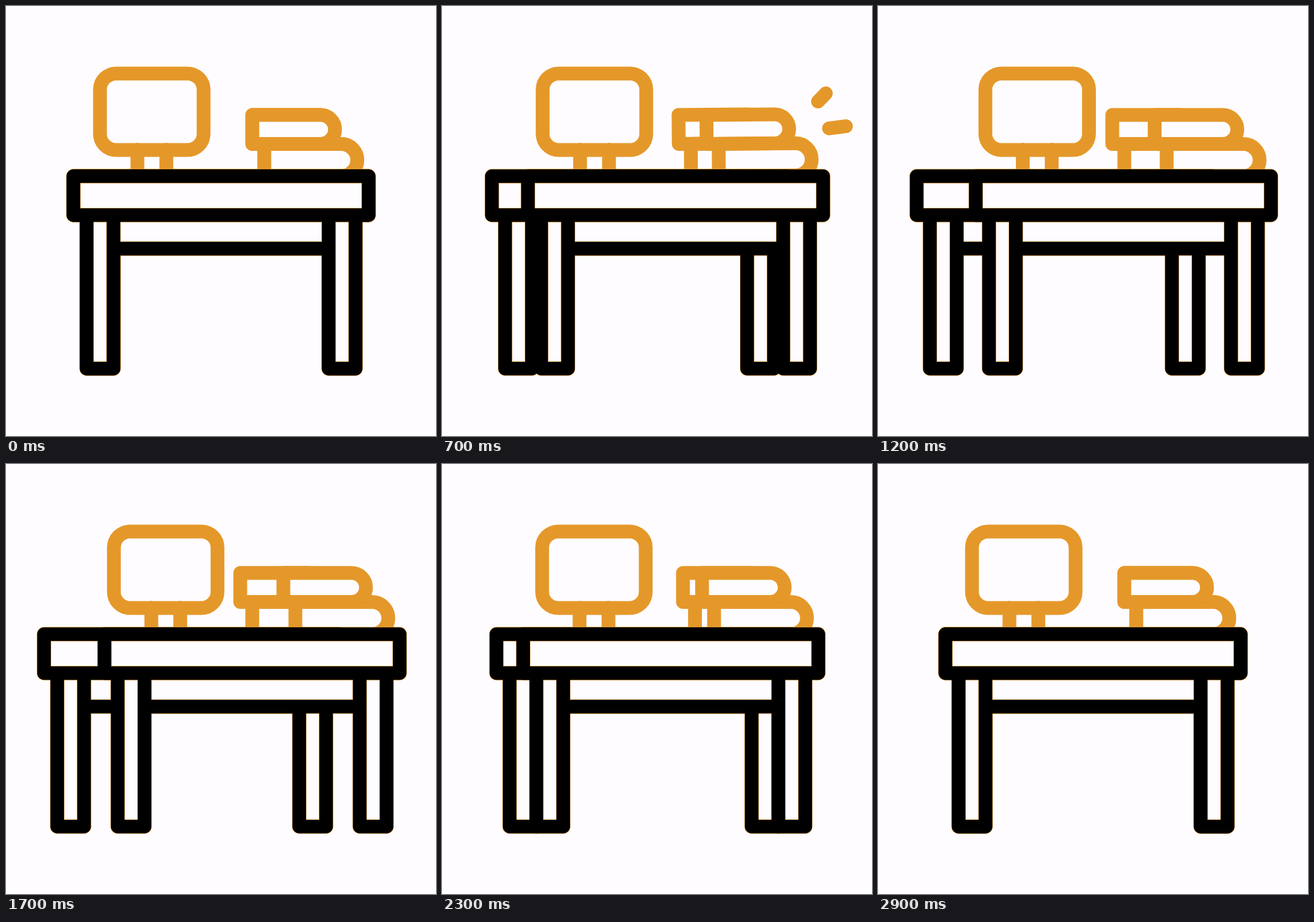
Recreate the animation shown at these times as an HTML page with a canvas. Size 748 by 748 pixels, loop 3 s.

```html
<!DOCTYPE html>
<html lang="en">
<head>
<meta charset="utf-8">
<title>Desk</title>
<style>
  html, body { margin: 0; width: 100%; height: 100%; overflow: hidden; background: #fefcff; }
  canvas { display: block; width: 748px; height: 748px; }
</style>
</head>
<body>
<canvas id="stage" width="748" height="748"></canvas>
<script>
const ctx = document.getElementById('stage').getContext('2d');
const PAPER = '#fefcff', ORANGE = '#e5982a', INK = '#000';
const LINE = 23.6, LOOP = 3000, STEP = 100;

const clamp = x => Math.min(1, Math.max(0, x));
const span = (t, from, length) => clamp((t - from) / length);
const sine = u => (1 - Math.cos(Math.PI * u)) / 2;

// Quick start with a long, soft landing: cubic-bezier(.4, 0, .2, 1)
function glide(u) {
  let lo = 0, hi = 1;
  for (let i = 0; i < 24; i++) {
    const s = (lo + hi) / 2, q = 1 - s;
    if (1.2 * q * q * s + 0.6 * q * s * s + s * s * s < u) lo = s; else hi = s;
  }
  return 3 * (1 - lo) * lo * lo + lo ** 3;
}

// 0 when closed, 1 when spread apart
const spread = (t, start) =>
  glide(span(t, start, 1200)) * (1 - sine(span(t, 1810, 913)));

function makePath(draw) {
  const path = new Path2D();
  draw(path);
  return path;
}

const deskPath = makePath(p => {
  p.rect(117.3, 296, 513.5, 67.7);
  p.rect(140.3, 363.7, 46.7, 267);
  p.rect(561.3, 363.7, 46.7, 267);
  p.moveTo(187, 422);
  p.lineTo(561.3, 422);
});

const monitorPath = makePath(p => {
  p.roundRect(163.5, 117.4, 180.2, 133, 28);
  for (const x of [228.6, 278.9]) {
    p.moveTo(x, 250);
    p.lineTo(x, 296);
  }
});

function bookPath(left, right, top, radius) {
  return makePath(p => {
    p.moveTo(left, top);
    p.lineTo(right, top);
    p.arc(right, top + radius, radius, -Math.PI / 2, Math.PI / 2);
    p.lineTo(left, top + 2 * radius);
    p.closePath();
  });
}
const books = [bookPath(449.4, 583, 240, 28), bookPath(428.5, 547, 189.5, 25.25)];

function stroke(path, color, width = LINE) {
  ctx.strokeStyle = color;
  ctx.lineWidth = width;
  ctx.stroke(path);
}

function shifted(dx, draw) {
  ctx.save();
  ctx.translate(dx, 0);
  draw();
  ctx.restore();
}

function drawDesk() {
  ctx.fillStyle = PAPER;
  ctx.fill(deskPath);
  ctx.fillRect(187, 363.7, 374.3, 58.3);
  // The fine orange rim must not show on top of black
  ctx.globalCompositeOperation = 'darken';
  stroke(deskPath, ORANGE, LINE + 1.3);
  ctx.globalCompositeOperation = 'source-over';
  stroke(deskPath, INK);
}

function drawBooks(tilt) {
  ctx.translate(428, 284);
  ctx.rotate(tilt);
  ctx.translate(-428, -284);
  ctx.fillStyle = PAPER;
  books.forEach(book => ctx.fill(book));
  books.forEach(book => stroke(book, ORANGE, 24));
}

function drawSpark(x1, y1, x2, y2, tail, head) {
  const at = u => [x1 + (x2 - x1) * u, y1 + (y2 - y1) * u];
  stroke(makePath(p => {
    p.moveTo(...at(tail));
    p.lineTo(...at(head));
  }), ORANGE, 24);
}

function render(t) {
  const desk = spread(t, 230);
  const tilt = -1.6 * Math.PI / 180 * Math.sin(Math.PI * span(t, 200, 550));

  ctx.fillStyle = PAPER;
  ctx.fillRect(0, 0, 748, 748);
  ctx.lineJoin = ctx.lineCap = 'round';

  shifted(24.2 * spread(t, 290), () => stroke(monitorPath, ORANGE, 24));
  shifted(-21 * spread(t, 100), () => drawBooks(tilt));
  shifted(54 * desk, () => drawBooks(tilt));

  if (t > 450 && t < 950) {
    const head = sine(span(t, 450, 350)), tail = sine(span(t, 600, 350));
    drawSpark(650, 170.3, 671.8, 147.8, tail, head);
    drawSpark(664.5, 214, 711.5, 208, tail, head);
  }

  ctx.lineCap = 'butt';
  shifted(-51.2 * desk, drawDesk);
  shifted(54 * desk, drawDesk);
}

const start = performance.now();
function tick() {
  const t = (performance.now() - start) % LOOP;
  render(Math.floor(t / STEP) * STEP);
  requestAnimationFrame(tick);
}
tick();
</script>
</body>
</html>
```
